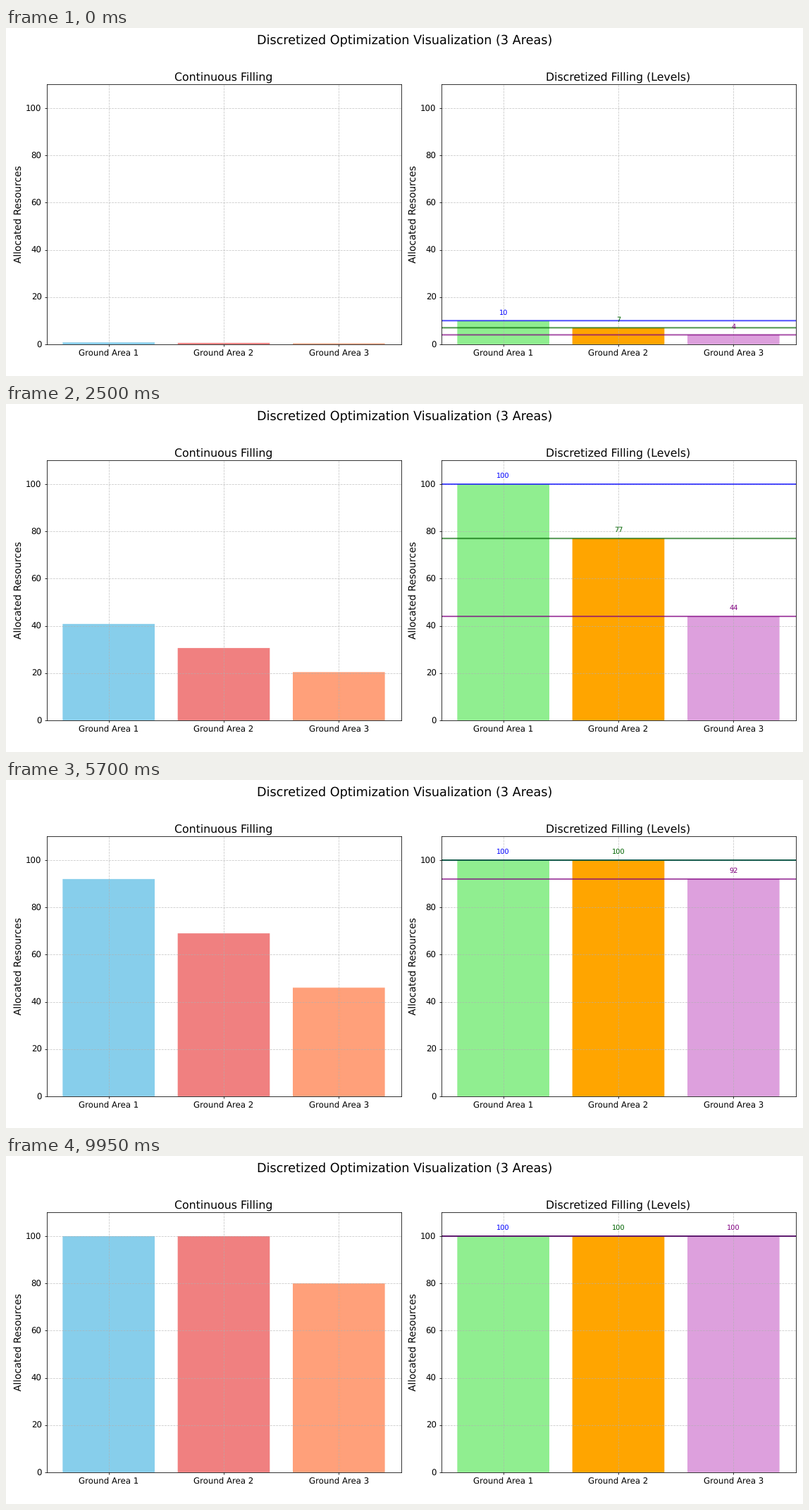
These frames come from a looping animation (1131 by 495 pixels, 10000 ms). A matplotlib script:

```python
import matplotlib.pyplot as plt
from matplotlib.animation import FuncAnimation

W, H = 1131, 495
DPI = W / 16
FRAMES, INTERVAL = 200, 50
CAP = 100
AREAS = ["Ground Area 1", "Ground Area 2", "Ground Area 3"]
RATES = [0.8, 0.6, 0.4]
STEPS = [10, 7, 4]
HOLD = 5  # frames per discrete level
LINE_COLORS = ["blue", "darkgreen", "purple"]
TOP, BOTTOM = 80.4, 449.9  # axes edges, pixels from the top

plt.rcParams.update({"font.family": "DejaVu Sans", "text.hinting": "none"})
fig = plt.figure(figsize=(16, H / DPI + 1e-9), dpi=DPI)
fig.suptitle("Discretized Optimization Visualization (3 Areas)", fontsize=18)


def panel(left, title, colors):
    ax = fig.add_axes([left / W, 1 - BOTTOM / H, 503 / W, (BOTTOM - TOP) / H])
    bars = ax.bar(AREAS, [0] * 3, color=colors, snap=False)
    ax.set_ylim(0, 110)
    ax.set_title(title, fontsize=16)
    ax.set_ylabel("Allocated Resources", fontsize=14)
    ax.tick_params(labelsize=12)
    ax.grid(True, linestyle="--", alpha=0.7)
    return ax, bars


_, cont_bars = panel(57.5, "Continuous Filling",
                     ["skyblue", "lightcoral", "lightsalmon"])
ax_disc, disc_bars = panel(617.5, "Discretized Filling (Levels)",
                           ["lightgreen", "orange", "plum"])
levels = [ax_disc.axhline(0, color=c, lw=2, alpha=0.7, snap=False)
          for c in LINE_COLORS]
labels = [ax_disc.text(i, 0, "", color=c, fontsize=10, ha="center", va="bottom")
          for i, c in enumerate(LINE_COLORS)]


def update(k):
    for bar, rate in zip(cont_bars, RATES):
        bar.set_height(min(CAP, rate * (k + 1)))
    for bar, line, label, step in zip(disc_bars, levels, labels, STEPS):
        value = min(CAP, step * (k // HOLD + 1))
        bar.set_height(value)
        line.set_ydata([value, value])
        label.set_y(value + 2)
        label.set_text(str(value))
    return [*cont_bars, *disc_bars, *levels, *labels]


anim = FuncAnimation(fig, update, frames=FRAMES, interval=INTERVAL,
                     init_func=lambda: update(0), repeat=True, repeat_delay=0)
plt.show()
```
